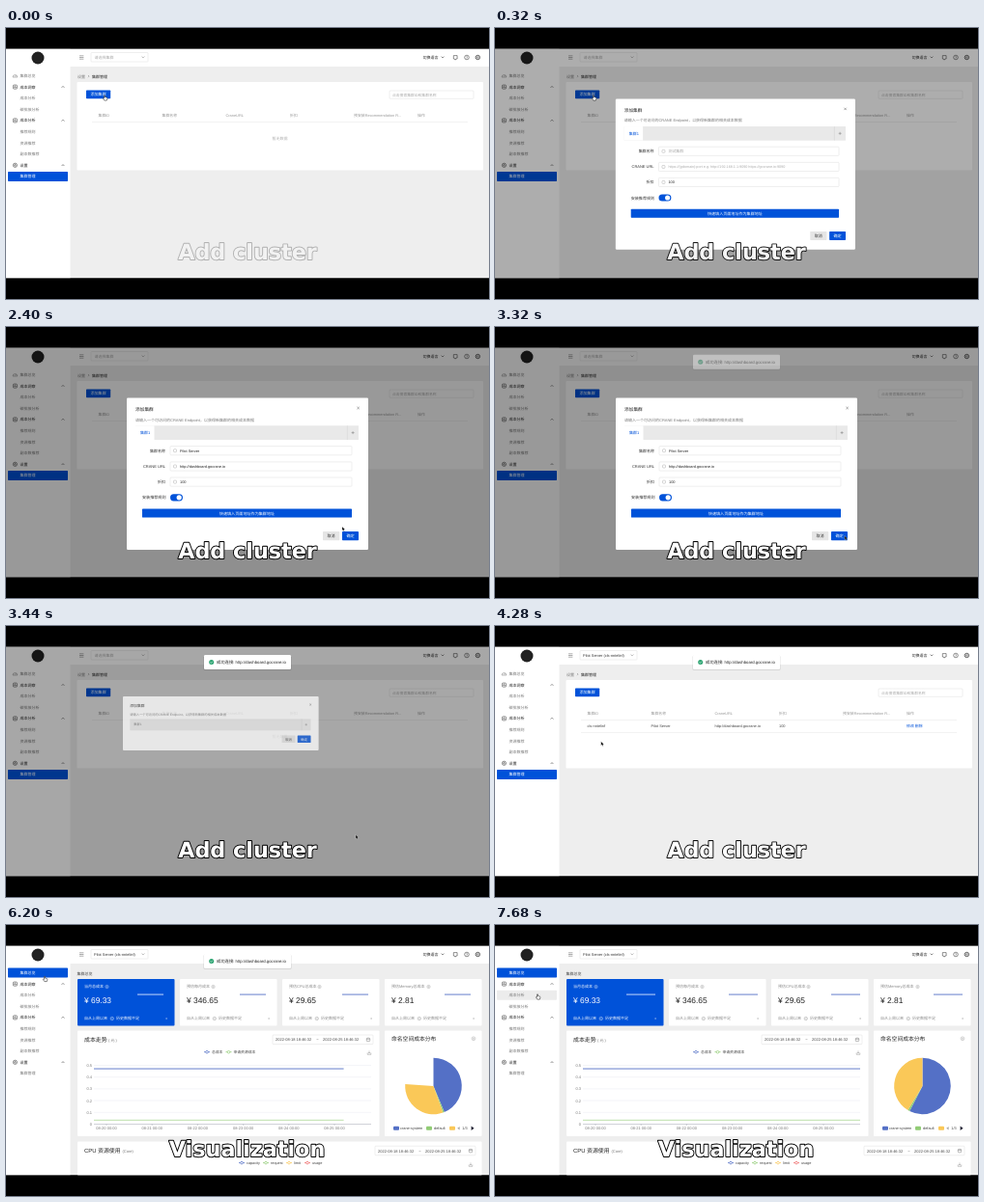
An HTML page that plays this animation: 500 px wide and 281 px high, repeating every 8000 ms.

```html
<!DOCTYPE html>
<html lang="zh">
<head>
<meta charset="utf-8">
<title>Add cluster</title>
<style>
html, body { margin: 0; width: 100%; height: 100%; overflow: hidden; background: #000; }
svg { display: block; width: 100%; height: 100%; }
text { font-family: "Liberation Sans", "Noto Sans CJK SC", "Noto Sans CJK", sans-serif; text-rendering: geometricPrecision; white-space: pre; }
.cap { font: bold 22.3px "DejaVu Sans", sans-serif; fill: #fff; stroke: #000; stroke-width: 1.9px; paint-order: stroke; stroke-linejoin: round; text-anchor: middle; }
</style>
</head>
<body>
<svg id="stage" viewBox="0 0 500 281"></svg>
<script>
const LOOP = 8000, BLUE = '#0052d9', INK = '#222', GREY = '#777', PALE = '#aaa';
const SERIES = ['#5470c6', '#91cc75', '#fac858', '#ee6666'];
const CLUSTER = 'Pilot Server', URL_TEXT = 'http://dashboard.gocrane.io';

// ---- markup helpers
const rect = (x, y, x2, y2, fill, more = '') =>
  `<rect x="${x}" y="${y}" width="${x2 - x}" height="${y2 - y}" fill="${fill}" ${more}/>`;
const box = (x, y, x2, y2, stroke = '#dcdcdc') =>
  rect(x, y, x2, y2, '#fff', `rx=".8" stroke="${stroke}" stroke-width=".5"`);
const text = (x, yc, s, fill = INK, size = 4, more = '') =>
  `<text x="${x}" y="${yc + size * 0.36}" font-size="${size}" fill="${fill}" ${more}>${s}</text>`;
const path = (d, stroke, w = 0.5, more = '') =>
  `<path d="${d}" fill="none" stroke="${stroke}" stroke-width="${w}" ${more}/>`;
const ring = (x, y, r, stroke, w = 0.5) =>
  `<circle cx="${x}" cy="${y}" r="${r}" fill="none" stroke="${stroke}" stroke-width="${w}"/>`;
const group = (id, body, more = '') => `<g id="${id}" ${more}>${body}</g>`;
const chevron = (x, y, c, up = 1) => path(`M${x - 1.4} ${y + 0.7 * up}l1.4 ${-1.4 * up}l1.4 ${1.4 * up}`, c);
const MID = 'text-anchor="middle"', END = 'text-anchor="end"', BOLD = 'font-weight="bold"', MEDIUM = 'font-weight="500"';

// ---- sidebar and header
const MENU = [['集群总览', 0], ['成本洞察', 1], ['成本分析', 2], ['碳排放分析', 2], ['成本分析', 1],
  ['推荐规则', 2], ['资源推荐', 2], ['副本数推荐', 2], ['设置', 1], ['集群管理', 2]];
const rowY = i => 49.5 + i * 11.6;

function menuItem([label, kind], i) {
  const y = rowY(i);
  let s = text(14.6, y, label, kind === 1 ? INK : GREY, 4, kind === 1 ? MEDIUM : '');
  if (kind === 1) s += chevron(59, y, INK);
  if (i === 0) s += path(`M7 ${y + 1.5}a2.4 2.4 0 1 1 4.8 0zM9.4 ${y + 1}l1 -1.6`, GREY);
  else if (i === 8) s += ring(9.4, y, 2.1, INK) + ring(9.4, y, 0.8, INK);
  else if (kind === 1) s += box(7.4, y - 2, 11.4, y + 2, INK) + path(`M8.6 ${y + 1}v-1.6M9.5 ${y + 1}v-2.4M10.4 ${y + 1}v-1`, INK, 0.4);
  return s;
}
const active = (id, i) => group(id,
  rect(2, rowY(i) - 5, 64, rowY(i) + 5, BLUE, 'rx=".7"') + text(14.6, rowY(i), MENU[i][0], '#fff'));
const hover = (id, i) => group(id, rect(2, rowY(i) - 5, 64, rowY(i) + 5, '#ececec', 'rx=".7"'));

const shell = () =>
  rect(0, 21.5, 500, 259.5, '#eee') + rect(0, 21.5, 500, 40, '#fff') + rect(0, 21.5, 66.5, 259.5, '#fff') +
  '<circle cx="33" cy="31" r="6.5" fill="#222"/>' +
  hover('hover0', 0) + hover('hover2', 2) + MENU.map(menuItem).join('') + active('act0', 0) + active('act9', 9) +
  path('M76 28.8h4.4M76 30.5h4.4M76 32.2h4.4', GREY, 0.6) +
  box(88, 25.5, 147, 35) + chevron(142, 30.2, GREY, -1) +
  group('pick0', text(91.5, 30.3, '请选择集群', PALE)) +
  group('pick1', text(91, 30.3, CLUSTER + ' (cls-nntelinf)', '#333', 3.95)) +
  text(431.5, 30.3, '切换语言') + chevron(452, 30.3, INK, -1) +
  path('M463.3 32l0 -3.4h3.8v3.4h-1.2l-.8 1.2l-.8 -1.2z', INK) +
  ring(477, 30.5, 2.3, INK) + text(477, 30.5, '?', INK, 3.6, MID) +
  ring(488.4, 30.5, 2.2, INK, 0.7) + ring(488.4, 30.5, 0.8, INK);

// ---- cluster list page
const COLS = [95.5, 161.5, 227.5, 294, 360, 426];
const cells = (list, y, c) => list.map((s, i) => text(COLS[i], y, s, c, 3.9)).join('');
const listPage = () =>
  text(74, 50.2, '设置', GREY) + path('M85 49l1.1 1.1l-1.1 1.1', GREY) + text(89, 50.2, '集群管理', INK) +
  rect(73.5, 56, 494, 147.5, '#fff', 'rx="1"') +
  rect(83, 64.5, 108.2, 73.3, BLUE, 'rx=".7"') + text(95.6, 69, '添加集群', '#fff', 4.1, MID) +
  box(397, 65, 484, 73.3) + text(400, 69.2, '点击搜索集群ID和集群名称', PALE, 3.8) +
  cells(['集群ID', '集群名称', 'CraneURL', '折扣', '预安装Recommendation R...', '操作'], 91, '#999') +
  path('M89 97.5H478', '#e4e4e4') +
  group('empty', text(283.5, 115, '暂无数据', '#b0b0b0', 4, MID)) +
  group('row', cells(['cls-nntelinf', CLUSTER, URL_TEXT, '100', '', ''], 104, '#444') +
    text(426, 104, '修改 删除', BLUE, 3.9) + path('M89 110.5H478', '#e4e4e4'));

// ---- dashboard page
function stat(i, title, value) {
  const x = 74 + i * 106, on = i === 0, c = on ? '#fff' : '#888';
  const w = [20, 24, 28, 35][i];
  return rect(x, 56, x + 100.5, 104.5, on ? BLUE : '#fff', 'rx="1"') +
    text(x + 7, 64, title, c) + ring(x + 10.5 + w, 64, 1.6, c, 0.4) + path(`M${x + 10.5 + w} 63.2v1.7`, c, 0.4) +
    text(x + 7, 77.7, '¥ ' + value, on ? '#fff' : INK, 8.4) +
    text(x + 7, 97, '自从上周以来', c) + ring(x + 35.8, 97, 1.7, c, 0.4) + path(`M${x + 34.8} 97h2`, c, 0.4) +
    text(x + 40, 97, '历史数据不足', c) + path(`M${x + 91.6} 96l1 1l-1 1`, c) +
    `<rect class="spark" x="${x + 62}" y="71.6" width="30" height=".9" fill="${on ? '#dbe6ff' : SERIES[0]}"/>`;
}
const dates = (x, y) => box(x, y, x + 104, y + 9.6) + text(x + 3, y + 5, '2022-08-18 18:46:32', '#444') +
  text(x + 46.5, y + 5, '~', '#444', 4, MID) + text(x + 52, y + 5, '2022-08-25 18:46:32', '#444') +
  box(x + 97.3, y + 3.2, x + 100.7, y + 6.6, GREY) + path(`M${x + 97.3} ${y + 4.3}h3.4`, GREY);
const mark = (x, y, c, label) => path(`M${x} ${y}h6`, c, 0.8) +
  `<circle cx="${x + 3}" cy="${y}" r="1.3" fill="#fff" stroke="${c}" stroke-width=".7"/>` + text(x + 8, y, label, '#444', 3.8);
const save = (x, y) => path(`M${x - 1.8} ${y}v1.8h3.6v-1.8M${x} ${y - 2}v2.6m-1 -1l1 1l1 -1`, GREY, 0.4);

function trend() {
  let s = '';
  for (let i = 0; i < 6; i++) {
    const y = 206.5 - i * 12.2;
    s += path(`M91 ${y}H378`, i ? '#e4e6ee' : '#8a8f9c', 0.4) + text(89, y, i ? '0.' + i : '0', GREY, 4, END);
    s += text(104 + i * 47.2, 211, `08-2${i} 00:00`, GREY, 4, MID) + path(`M${104 + i * 47.2} 206.5v1.5`, '#8a8f9c', 0.4);
  }
  return s + `<rect class="line" x="91" y="148.6" width="287" height=".9" fill="${SERIES[0]}"/>` +
    `<rect class="line" x="91" y="201.9" width="287" height=".6" fill="${SERIES[1]}"/>`;
}
const dashPage = () =>
  text(73.5, 50.2, '集群总览', '#444') +
  [['当月总成本', '69.33'], ['预估每月成本', '346.65'], ['预估CPU总成本', '29.65'], ['预估Memory总成本', '2.81']]
    .map((d, i) => stat(i, ...d)).join('') +
  rect(74, 109.5, 386.5, 219, '#fff', 'rx="1"') +
  text(81, 118.8, '成本走势', INK, 5.9, MEDIUM) + text(106, 119.3, '( 元 )', GREY) + dates(276, 114) +
  mark(205, 131.7, SERIES[0], '总成本') + mark(227.5, 131.7, SERIES[1], '申请资源成本') + save(376, 132.5) + trend() +
  rect(392, 109.5, 492.5, 219, '#fff', 'rx="1"') + text(399, 118.2, '命名空间成本分布', INK, 5.8, MEDIUM) +
  ring(484, 117.8, 1.9, PALE) + ring(484, 117.8, 0.7, PALE) +
  '<circle id="noPie" cx="442.5" cy="167" r="29.3" fill="#d3d3d3"/>' +
  group('pie', [0, 1, 2].map(i => `<path class="slice" fill="${SERIES[i]}"/>`).join('')) +
  group('pieKey', [401, 435, 459].map((x, i) => rect(x, 208.7, x + 6, 212.7, SERIES[i], 'rx="1"')).join('') +
    text(408, 210.8, 'crane-system', '#444', 3.9) + text(443, 210.8, 'default', '#444', 3.9) +
    '<path d="M469.6 209v3.6l-2.4 -1.8z" fill="#aaa"/><path d="M481.6 208.6v4.4l3 -2.2z" fill="#223"/>' +
    text(472.3, 210.8, '1/3', '#444', 3.9)) +
  rect(74, 224.5, 492.5, 260, '#fff', 'rx="1"') +
  text(81, 234, 'CPU 资源使用', INK, 5.9, MEDIUM) + text(120.5, 234.3, '(Core)', GREY) + dates(382, 229.2) +
  ['capacity', 'request', 'limit', 'usage'].map((s, i) => mark([241, 266, 290, 309][i], 246.6, SERIES[i], s)).join('') +
  save(481, 248.5);

// ---- dialog
const fieldRow = (y, label, inner) => text(165, y, label, '#333', 4, END) + box(170, y - 4.6, 358, y + 4.6) +
  box(173.5, y - 1.5, 176.5, y + 1.5, PALE) + inner;
const dialog = () =>
  '<rect id="panel" x="125" y="73.5" width="250" rx="1.3" fill="#fff"/>' +
  text(134, 85, '添加集群', INK, 4.7, MEDIUM) + path('M363.4 82.8l2.4 2.4m0 -2.4l-2.4 2.4', '#555') +
  text(134, 96.2, '请输入一个可访问的CRANE Endpoint，以获得新集群的相关成本数据', GREY) +
  rect(134, 102.3, 365, 117, '#e9e9e9') + path('M353.3 102.3v14.7', '#d0d0d0') +
  path('M357.6 109.6h3M359.1 108.1v3', GREY) +
  group('tabOff', text(139, 109.6, '集群1', GREY)) +
  group('form', rect(134, 102.3, 153.5, 117, '#fff') + text(139, 109.6, '集群1', BLUE) +
    fieldRow(128.2, '集群名称', group('ph1', text(180, 128.2, '测试集群', PALE)) + group('val1', text(180, 128.2, CLUSTER, INK, 3.9))) +
    fieldRow(144.5, 'CRANE URL', group('ph2', text(180, 144.5, 'https://(gdomain):port e.g. http://192.168.1.1:9090 https://gocrane.io:9090', PALE, 3.75)) +
      group('val2', text(180, 144.5, URL_TEXT, INK, 3.87))) +
    fieldRow(160.6, '折扣', text(180, 160.6, '100', INK, 3.9)) +
    text(141, 177, '安装推荐规则', '#333', 4.1) + rect(170, 173.2, 183, 180.4, BLUE, 'rx="3.6"') +
    '<circle cx="179.2" cy="176.8" r="2.6" fill="#fff"/>' +
    rect(141, 188.6, 358, 197.6, BLUE, 'id="quick" rx=".7"') +
    text(249.5, 193.2, '快速填入页面地址作为集群地址', '#fff', 4.1, MID + ' ' + MEDIUM)) +
  group('foot', rect(328, 212, 345.3, 221.2, '#e5e5e5', 'rx=".7"') + text(336.6, 216.7, '取消', '#333', 4.1, MID) +
    rect(348, 212, 365, 221.2, BLUE, 'rx=".7"') + text(356.5, 216.7, '确定', '#fff', 4.1, MID));

const toast = () =>
  rect(204.4, 30.6, 295.6, 46, '#000', 'rx="1.6" opacity=".1"') + rect(205, 30, 295, 45, '#fff', 'rx="1.3"') +
  '<circle cx="212.7" cy="37.5" r="2.5" fill="#2ba471"/>' + path('M211.5 37.5l.9 .9l1.6 -1.7', '#fff', 0.6) +
  text(218, 37.5, '成功连接: ' + URL_TEXT, '#222', 4.3);

document.getElementById('stage').innerHTML =
  shell() + group('list', listPage()) + group('dash', dashPage()) +
  rect(0, 21.5, 500, 259.5, '#000', 'id="mask"') + group('dialog', dialog()) + group('toast', toast()) +
  '<text id="cap1" class="cap" x="250" y="240">Add cluster</text><text id="cap2" class="cap" x="249.5" y="240">Visualization</text>' +
  group('cursor', '<path id="hand" d="M-.5 .4q.5 -.6 1 0V2.1l1.9 .5q.7 .3 .5 1.2L2.3 5.6H-.2L-1.7 3.4q.2 -.8 1.2 0z" fill="#fff" stroke="#111" stroke-width=".5"/>' +
    '<path id="arrow" d="M0 0V4.2L1 3.3L1.7 4.8L2.4 4.5L1.8 3.1L3 3z" fill="#000" stroke="#fff" stroke-width=".3"/>') +
  rect(0, 0, 500, 21.5, '#000') + rect(0, 259.5, 500, 281, '#000');

// ---- motion
const $ = {};
document.querySelectorAll('[id]').forEach(e => { $[e.id] = e; });
const lines = document.querySelectorAll('.line'), sparks = document.querySelectorAll('.spark'), slices = document.querySelectorAll('.slice');
const ramp = (t, a, b) => Math.min(1, Math.max(0, (t - a) / (b - a)));
const easeOut = p => 1 - (1 - p) ** 3;
const smooth = p => p * p * (3 - 2 * p);
const show = (e, on) => e.setAttribute('display', on ? 'inline' : 'none');
const fade = (e, o) => { show(e, o > 0); e.setAttribute('opacity', o); };

// time, x, y of the pointer tip
const TRACK = [[0, 102, 69.5], [960, 102, 69.5], [1480, 264, 192.5], [1720, 264, 192.5], [2360, 348, 207], [2520, 348, 207],
  [2720, 357, 215.5], [2900, 357, 215.5], [3360, 362, 216.5], [3480, 362, 216.5], [3960, 110, 120], [4260, 110, 120],
  [4880, 40, 53], [6800, 40, 53], [7400, 44, 71.5], [LOOP, 44, 71.5]];
const HANDS = [[0, 1000], [1420, 1800], [2640, 3000], [4700, LOOP]];
const within = (t, spans) => spans.some(([a, b]) => t >= a && t < b);

function pointer(t) {
  const i = Math.max(1, TRACK.findIndex(k => k[0] > t));
  const [a, x, y] = TRACK[i - 1], [b, x2, y2] = TRACK[i];
  const p = smooth(ramp(t, a, b));
  return [x + (x2 - x) * p, y + (y2 - y) * p];
}
function wedge(a, b) {
  const at = d => `${442.5 + 29.3 * Math.sin(d * Math.PI / 180)} ${167 - 29.3 * Math.cos(d * Math.PI / 180)}`;
  return `M442.5 167L${at(a)}A29.3 29.3 0 ${b - a > 180 ? 1 : 0} 1 ${at(b)}Z`;
}

function draw(t) {
  const dash = t >= 5300, filled = t >= 1740, closing = t >= 3360;
  show($.list, !dash);
  show($.dash, dash);
  show($.empty, t < 3560);
  show($.row, t >= 3560);
  show($.pick0, t < 3600);
  show($.pick1, t >= 3600);
  fade($.act0, ramp(t, 5310, 5510));
  fade($.act9, 1 - ramp(t, 5260, 5460));
  fade($.hover0, t < 5500 ? ramp(t, 4780, 4880) : 0);
  fade($.hover2, ramp(t, 7180, 7340));

  // dialog zooms out of the add button and back into it
  const up = ramp(t, 40, 390), down = ramp(t, 3360, 3660);
  const k = easeOut(up) * (1 - down ** 1.27);
  fade($.dialog, up * 1.25 > 1 ? 1 - down : up * 1.25);
  $.dialog.setAttribute('transform', `translate(104 71) scale(${k}) translate(-104 -71)`);
  fade($.mask, 0.4 * ramp(t, 40, 390) * (1 - ramp(t, 3400, 3700)));
  show($.form, !closing);
  $.panel.setAttribute('height', closing ? 69 : 157.5);
  $.foot.setAttribute('transform', `translate(0 ${closing ? -88.5 : 0})`);
  for (const id of ['ph1', 'ph2']) show($[id], !filled);
  for (const id of ['val1', 'val2']) show($[id], filled);
  $.quick.setAttribute('fill', within(t, [[1420, 1900]]) ? '#266fe8' : BLUE);

  const enter = ramp(t, 3260, 3420);
  fade($.toast, enter * (1 - ramp(t, 6280, 6440)));
  $.toast.setAttribute('transform', `translate(0 ${-5 * (1 - easeOut(enter))})`);

  // charts
  const reveal = ramp(t, 5300, 6300);
  lines.forEach(e => e.setAttribute('width', 287 * reveal));
  sparks.forEach(e => e.setAttribute('width', 30 * reveal));
  const pie = t >= 5860, sweep = easeOut(ramp(t, 5860, 6760));
  show($.noPie, !pie);
  show($.pie, pie);
  show($.pieKey, pie);
  const cuts = [0, 207, 211, 359.99];
  slices.forEach((e, i) => e.setAttribute('d', wedge(cuts[i] * sweep, cuts[i + 1] * sweep)));

  fade($.cap1, Math.min(1, 0.25 + t / 500) * (1 - ramp(t, 4260, 4800)));
  fade($.cap2, ramp(t, 5120, 5620));

  const hand = within(t, HANDS), [x, y] = pointer(t);
  $.cursor.setAttribute('transform', `translate(${x} ${y})`);
  show($.hand, hand);
  show($.arrow, !hand);
}

const start = performance.now();
function tick() {
  draw((performance.now() - start) % LOOP);
  requestAnimationFrame(tick);
}
draw(0);
requestAnimationFrame(tick);
</script>
</body>
</html>
```
